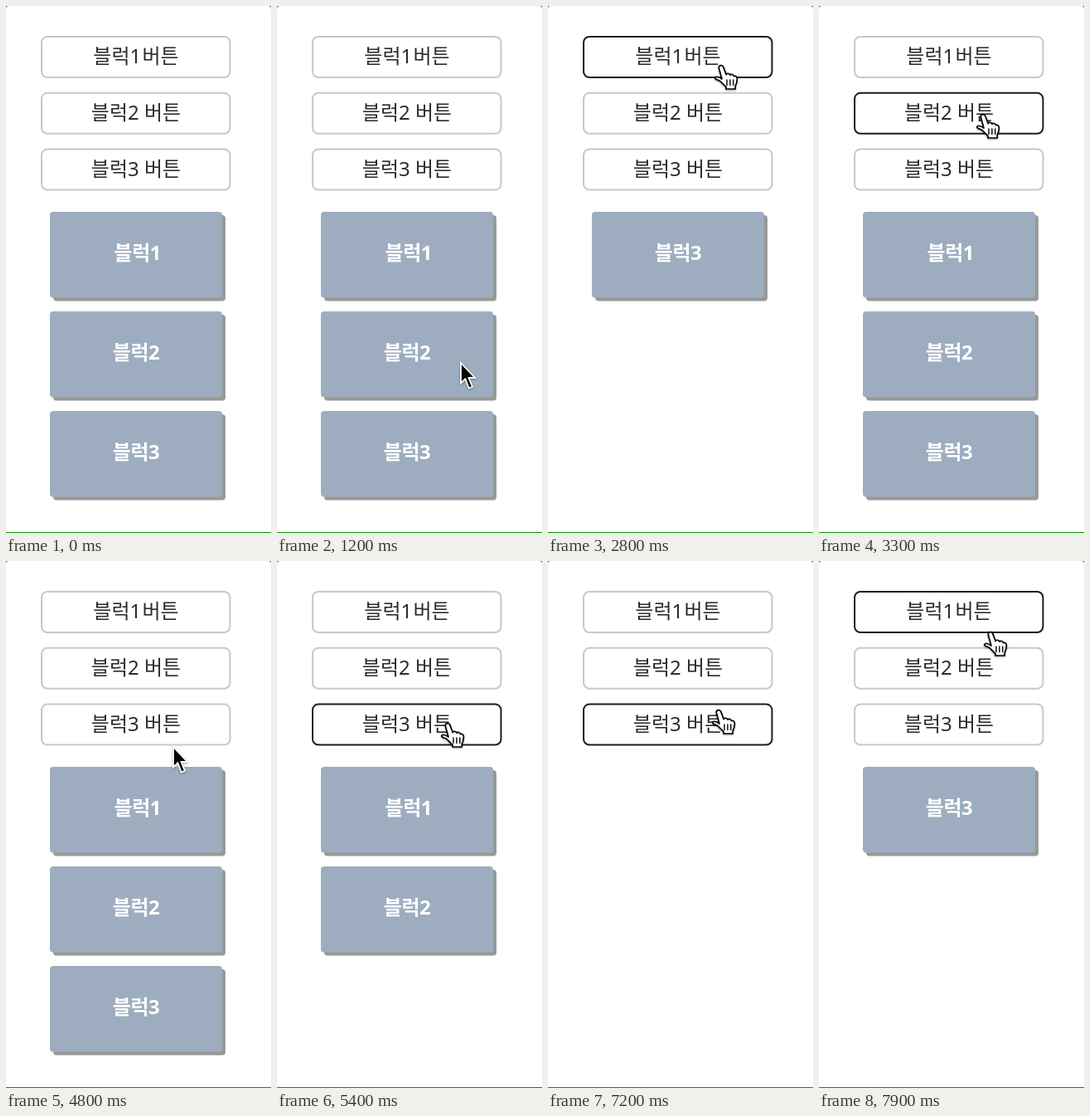
An HTML page for the animation above (8000 ms loop, 320x635 px).

```html
<!DOCTYPE html>
<html lang="ko">
<head>
<meta charset="utf-8">
<style>
  html, body { margin: 0; width: 100%; height: 100%; overflow: hidden; background: #fff; }
  svg { display: block; }
  text { font: 24px "Noto Sans", "Noto Sans CJK KR", "Noto Sans CJK JP", sans-serif; text-anchor: middle; fill: #2b2b2b; }
  .one { letter-spacing: -5px; }
  .button rect { fill: #fff; stroke: #c8c8c8; stroke-width: 2; }
  .button.hover rect { stroke: #1c1c1f; }
  .block text { font-weight: 700; fill: #fff; letter-spacing: -.5px; }
  .block .one { letter-spacing: -4px; }
  #arrow, #hand { filter: drop-shadow(0 1.5px 1px #0006); }
</style>
</head>
<body>
<svg width="320" height="635" viewBox="0 0 320 635">
  <path d="M0 0H3Q0 0 0 3ZM320 0H317Q320 0 320 3Z" fill="#333"/>
  <path d="M0 634H320V635H0Z" fill="#0a8f0a"/>
  <g id="stage"></g>
  <path id="arrow" d="M0 0V24.5L5.4 19.4L9.8 30.5L14 28.8L9.5 18H17Z" stroke="#fff" stroke-width="1.8"/>
  <g id="hand" stroke="#000" stroke-width="1.7" stroke-linejoin="round" stroke-linecap="round">
    <path fill="#fff" d="M-1.6 3C-2.2 -.8 2.6 -1.6 3.8 1.6L7.2 10.6C8 8.6 11.2 8.8 12 11.2C13.2 9.6 15.8 10.4 16.4 12.6C18.2 11.6 20.4 13.2 20.4 15.6C20.5 19 19.5 21.8 18.2 24.6V28H7V25.5C4 23 2 20-1 18C-4 16.4-6.8 16.6-6.2 14.6C-5.4 12.6-2 13.2 2 16Z"/>
    <path fill="none" stroke-width="1.4" d="M8 17V23.5M11.9 17V23.5M15.8 17V23.5"/>
  </g>
</svg>
<script>
const LOOP = 8000, STEP = 100, TRAVEL = 300, CLICK_DELAY = 100;
const ids = [1, 2, 3];
const $ = id => document.getElementById(id);
const buttonTop = i => 36 + i * 67.8;

// Pointer stops: arrival time, x, y, block toggled shortly after arriving
const stops = [
  [0, 238, 680], [300, 240, 598], [900, 226, 558], [1200, 222, 430], [1500, 212, 260],
  [1800, 206, 119, 2], [2500, 208, 72, 1], [2800, 208, 72, 1], [3200, 197, 131, 2],
  [3700, 205, 74], [4800, 202, 224], [5100, 205, 196, 3], [5900, 211, 72, 1],
  [6400, 214, 10], [6700, 207, 126, 2], [7200, 205, 180, 3], [7900, 206, 86]
];

const label = n => n === 1 ? '블럭<tspan class="one">1</tspan>' : '블럭' + n;

$('stage').innerHTML = ids.map((n, i) => `
  <g class="button">
    <rect x="43" y="${buttonTop(i) + 1}" width="227.5" height="49" rx="7"/>
    <text x="157" y="${69 + i * 68}">${label(n)} 버튼</text>
  </g>
  <g class="block">
    <rect x="57" y="252" width="208" height="103.5" rx="4" fill="#999"/>
    <rect x="53" y="248" width="208" height="103.5" rx="4" fill="#9dadbf"/>
    <text x="157" y="306">${label(n)}</text>
  </g>`).join('');

const buttons = document.querySelectorAll('.button');
const blocks = document.querySelectorAll('.block');

// Rest at each stop, then ease to the next one just in time
function tipAt(t) {
  const next = stops.findIndex(([at]) => at > t);
  if (next < 0) return stops.at(-1).slice(1, 3);
  const [, x0, y0] = stops[next - 1], [at, x1, y1] = stops[next];
  const u = Math.max(0, 1 - (at - t) / TRAVEL), e = u * u * (3 - 2 * u);
  return [x0 + (x1 - x0) * e, y0 + (y1 - y0) * e];
}

function isShown(id, t) {
  const clicks = stops.filter(([at, , , block]) => block === id && at + CLICK_DELAY <= t);
  return clicks.length % 2 === 0;
}

function draw(now) {
  const t = Math.floor(now % LOOP / STEP) * STEP;
  const [x, y] = tipAt(t);
  let over = false;
  buttons.forEach((b, i) => {
    const hit = y >= buttonTop(i) && y <= buttonTop(i) + 51;
    b.classList.toggle('hover', hit);
    over ||= hit;
  });

  let row = 0;
  blocks.forEach((b, i) => {
    const shown = isShown(ids[i], t);
    b.style.display = shown ? '' : 'none';
    if (shown) b.setAttribute('transform', `translate(0 ${120 * row++})`);
  });

  for (const id of ['arrow', 'hand']) {
    $(id).style.display = over === (id === 'hand') ? '' : 'none';
    $(id).setAttribute('transform', `translate(${x} ${y})`);
  }
}

function tick() {
  draw(performance.now());
  requestAnimationFrame(tick);
}
tick();
</script>
</body>
</html>
```
